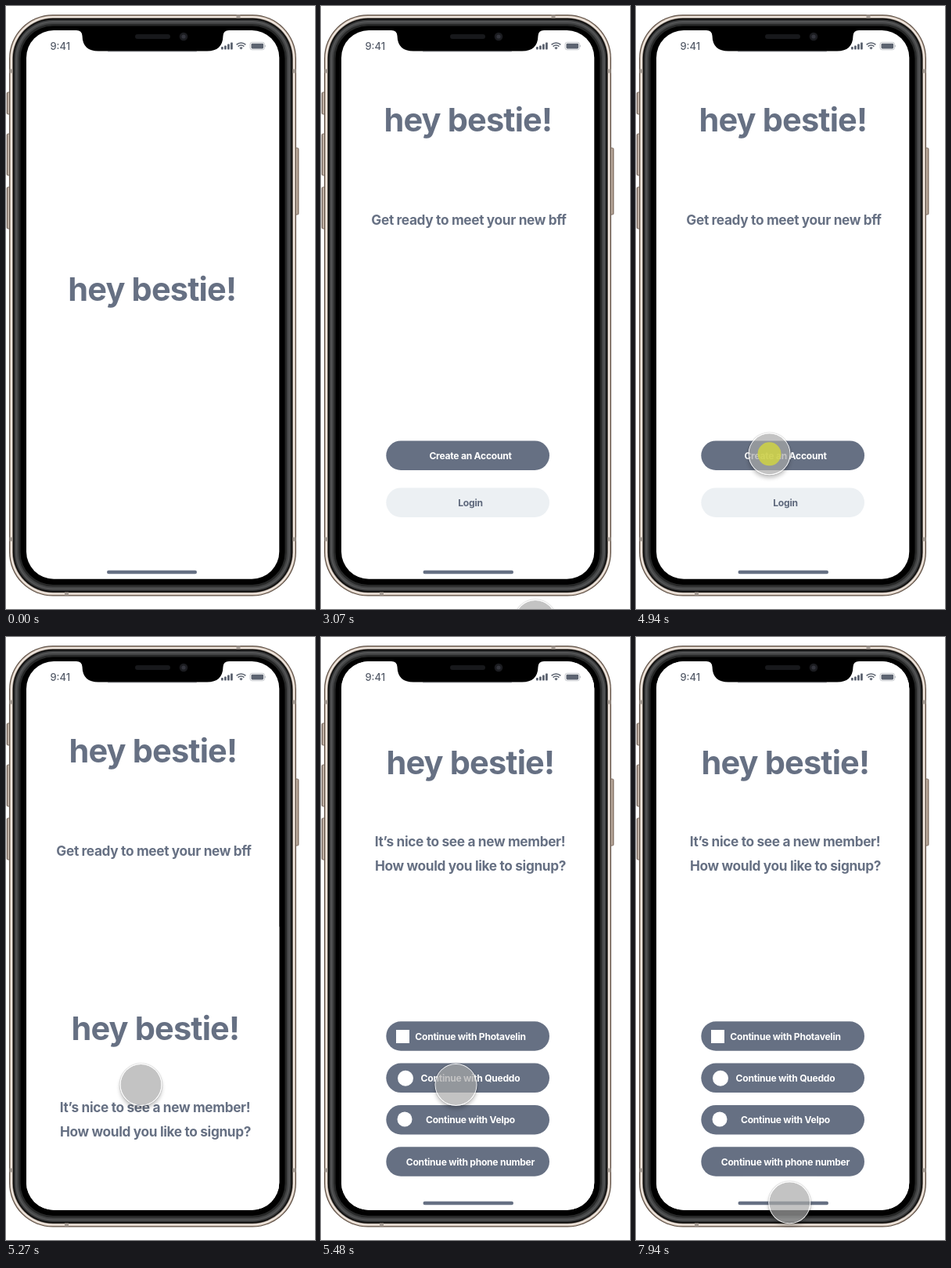
These frames come from a looping animation (395 by 769 pixels, 8 s). An HTML page:

```html
<!DOCTYPE html>
<html lang="en">
<head>
<meta charset="utf-8">
<title>Sign-up flow</title>
<style>
  html, body { margin: 0; width: 100%; height: 100%; overflow: hidden; background: #fff; }
  #stage { position: absolute; left: 0; top: 0; width: 395px; height: 769px; overflow: hidden; }
  svg { position: absolute; left: 0; top: 0; display: block; }
  text {
    font-family: Inter, "Liberation Sans", sans-serif;
    font-weight: 700; font-optical-sizing: none; letter-spacing: -.02em;
    text-anchor: middle; fill: #667083;
  }
  .title { font-size: 41.5px; }
  .lead { font-size: 17.25px; }
  .label { font-size: 12.07px; fill: #fff; }
  .label.dark { fill: #5d677b; }
  .clock { font-size: 12.9px; font-weight: 500; letter-spacing: 0; text-anchor: start; fill: #565d6a; }
  .ink { fill: #667083; }
  #cursor {
    position: absolute; left: -27px; top: -27px; width: 54px; height: 54px;
    box-sizing: border-box; border: 1.2px solid rgba(255,255,255,.95); border-radius: 50%;
    background: rgba(168,168,168,.69) padding-box;
    box-shadow: 0 0 1.5px rgba(0,0,0,.45), 0 4px 5px rgba(0,0,0,.22);
  }
  #press {
    position: absolute; left: 50%; top: 50%; width: 30px; height: 30px; margin: -15px;
    border-radius: 50%; background: rgba(211,215,62,.8);
  }
</style>
</head>
<body>
<div id="stage">
<svg width="395" height="769" viewBox="0 0 395 769">
  <defs>
    <clipPath id="glass"><rect x="26" y="31" width="323.3" height="699.7" rx="35"/></clipPath>
    <linearGradient id="side">
      <stop offset="0" stop-color="#5f5046"/><stop offset=".4" stop-color="#d9cabd"/><stop offset="1" stop-color="#8d7a6c"/>
    </linearGradient>
  </defs>

  <g fill="url(#side)" stroke="#6a594d" stroke-width=".8">
    <rect x="1.2" y="110" width="5" height="28" rx="1.5"/>
    <rect x="1.2" y="163" width="5" height="53" rx="1.5"/>
    <rect x="1.2" y="231" width="5" height="53" rx="1.5"/>
    <rect x="369" y="181" width="5" height="85" rx="1.5"/>
  </g>
  <g id="body"></g>
  <g fill="#a39a92">
    <rect x="294.5" y="11.5" width="5" height="4"/>
    <rect x="75" y="747.5" width="5" height="4"/>
    <rect x="4.5" y="80.5" width="4" height="5"/>
    <rect x="366.5" y="80.5" width="4" height="5"/>
    <rect x="4.5" y="677.5" width="4" height="5"/>
    <rect x="366.5" y="677.5" width="4" height="5"/>
  </g>

  <g clip-path="url(#glass)">
    <rect x="26" y="31" width="324" height="700" fill="#fff"/>
    <g id="splash">
      <text class="title" x="186.7" y="376">hey bestie!</text>
      <rect class="ink" x="129" y="719.8" width="115" height="4.4" rx="2.2"/>
    </g>
    <g id="welcome">
      <text class="title" x="187.8" y="160.3">hey bestie!</text>
      <text class="lead" x="189" y="279.4">Get ready to meet your new bff</text>
      <rect class="ink" x="83.3" y="554.4" width="208.7" height="37.5" rx="18.75"/>
      <text class="label" x="191" y="577.6">Create an Account</text>
      <rect x="83.3" y="614.4" width="208.7" height="37.5" rx="18.75" fill="#ecf0f3"/>
      <text class="label dark" x="191" y="637.6">Login</text>
      <rect class="ink" x="130.5" y="719.8" width="115.5" height="4.4" rx="2.2"/>
    </g>
    <g id="signup">
      <rect x="26" y="31" width="324" height="700" fill="#fff"/>
      <text class="title" x="190.8" y="175.4">hey bestie!</text>
      <text class="lead" x="190.5" y="267.2">It’s nice to see a new member!</text>
      <text class="lead" x="191" y="298.4">How would you like to signup?</text>
      <g id="options"></g>
      <g fill="#fff">
        <rect x="96" y="501" width="17" height="17"/>
        <circle cx="108" cy="562.7" r="10"/>
        <circle cx="107" cy="615" r="9.5"/>
      </g>
      <rect class="ink" x="130.5" y="719.8" width="115.5" height="4.4" rx="2.2"/>
    </g>
  </g>

  <rect x="130" y="57" width="114" height="1.8" rx=".9" fill="#c4c6ca"/>
  <path d="M90 30V31Q97 31 97.5 38Q98 57.6 118 57.6H257Q277 57.6 277.5 38Q278 31 285 31V30Z"/>
  <rect x="165" y="36" width="45" height="6" rx="3" fill="#17181b"/>
  <circle cx="227" cy="39" r="5.3" fill="#1b1c20"/>
  <circle cx="227" cy="39" r="2.6" fill="#33343c"/>

  <text class="clock" x="56.5" y="55.5">9:41</text>
  <g fill="#5c6370">
    <g id="signal"></g>
    <rect x="313.5" y="47.7" width="15.7" height="6.8" rx="1.4"/>
    <path d="M331 49.6a1.7 1.7 0 0 1 0 3z" opacity=".45"/>
    <rect x="312" y="46.3" width="18.5" height="9.5" rx="2.6" fill="none" stroke="#5c6370" stroke-width=".8" opacity=".4"/>
    <path d="M300.5 55.6L298.4 53.4A3 3 0 0 1 302.6 53.4Z"/>
    <g fill="none" stroke="#5c6370" stroke-width="1.5">
      <path d="M296.6 51.6A5.6 5.6 0 0 1 304.4 51.6"/>
      <path d="M294.6 49.4A8.4 8.4 0 0 1 306.4 49.4"/>
    </g>
  </g>
</svg>
<div id="cursor"><div id="press"></div></div>
</div>

<script>
const LOOP = 8000, STEP = 1000 / 15;
const $ = id => document.getElementById(id);

// Phone shell: nested rounded rings, [inset, colour]
$('body').innerHTML = [
  [0, '#5e5046'], [1.2, '#d3c3b5'], [2.2, '#f1e9e2'], [4, '#8d8177'], [4.8, '#0c0c0c'],
  [6.4, '#363738'], [8, '#535455'], [10, '#434445'], [12, '#262727'], [14.5, '#000']
].map(([d, c]) => `<rect x="${4 + d}" y="${11 + d}" width="${367 - 2 * d}" height="${741.5 - 2 * d}" rx="${56 - d}" fill="${c}"/>`).join('');

$('signal').innerHTML = [3.4, 5, 7, 9].map((h, i) =>
  `<rect x="${275 + i * 4}" y="${55.5 - h}" width="2.8" height="${h}" rx=".8"/>`).join('');

$('options').innerHTML = ['Photavelin', 'Queddo', 'Velpo', 'phone number'].map((name, i) => {
  const y = 490.3 + i * 53.3;
  return `<rect class="ink" x="83.3" y="${y}" width="208.7" height="37.5" rx="18.75"/>` +
    `<text class="label" x="191" y="${y + 23.3}">Continue with ${name}</text>`;
}).join('');

// Cursor path: [step, x, y]
const path = [
  [16, 388, 788], [17, 378, 780], [18, 420, 830],
  [46, 274, 784], [47, 250, 750], [49, 196, 683], [50, 172, 652], [51, 155.5, 626],
  [52, 157, 606], [53, 161, 591], [54, 165, 581], [55, 168, 575], [57, 170.5, 571.3],
  [74, 170.5, 571.3], [75, 172.5, 571], [106, 172.5, 571],
  [107, 173, 575], [108, 175, 593], [109, 179, 627], [110, 184, 668], [111, 189, 700],
  [112, 192.5, 716], [113, 194.5, 721.3], [118, 194.5, 721.3], [119, 196.3, 721.3]
];

function cursorAt(n) {
  if (n < 16 || (n > 17 && n < 46)) return [500, 900];
  const i = path.findIndex(p => p[0] >= n);
  const b = path[i], a = path[i - 1] || b;
  const k = a === b ? 1 : (n - a[0]) / (b[0] - a[0]);
  return [a[1] + (b[1] - a[1]) * k, a[2] + (b[2] - a[2]) * k];
}

// cubic-bezier(0, 0, .58, 1)
function easeOut(u) {
  if (u <= 0) return 0;
  if (u >= 1) return 1;
  let lo = 0, hi = 1;
  for (let i = 0; i < 24; i++) {
    const s = (lo + hi) / 2;
    if (1.74 * s * s - .74 * s ** 3 < u) lo = s; else hi = s;
  }
  return 3 * lo * lo - 2 * lo ** 3;
}

const show = (id, on) => { $(id).style.display = on ? '' : 'none'; };

function draw(t) {
  const n = Math.min(119, Math.floor((t + 7) / STEP));
  const slide = easeOut((n * STEP - 5160) / 300);
  show('splash', n < 12);
  show('welcome', n >= 12 && slide < 1);
  show('signup', slide > 0);
  $('signup').setAttribute('transform', `translate(0 ${700 * (1 - slide)})`);
  const [x, y] = cursorAt(n);
  $('cursor').style.transform = `translate(${x}px, ${y}px)`;
  show('press', n === 74 || n === 75);
  $('press').style.opacity = n === 75 ? .5 : 1;
}

const start = performance.now();
function tick() {
  draw((performance.now() - start) % LOOP);
  requestAnimationFrame(tick);
}
draw(0);
requestAnimationFrame(tick);
</script>
</body>
</html>
```
